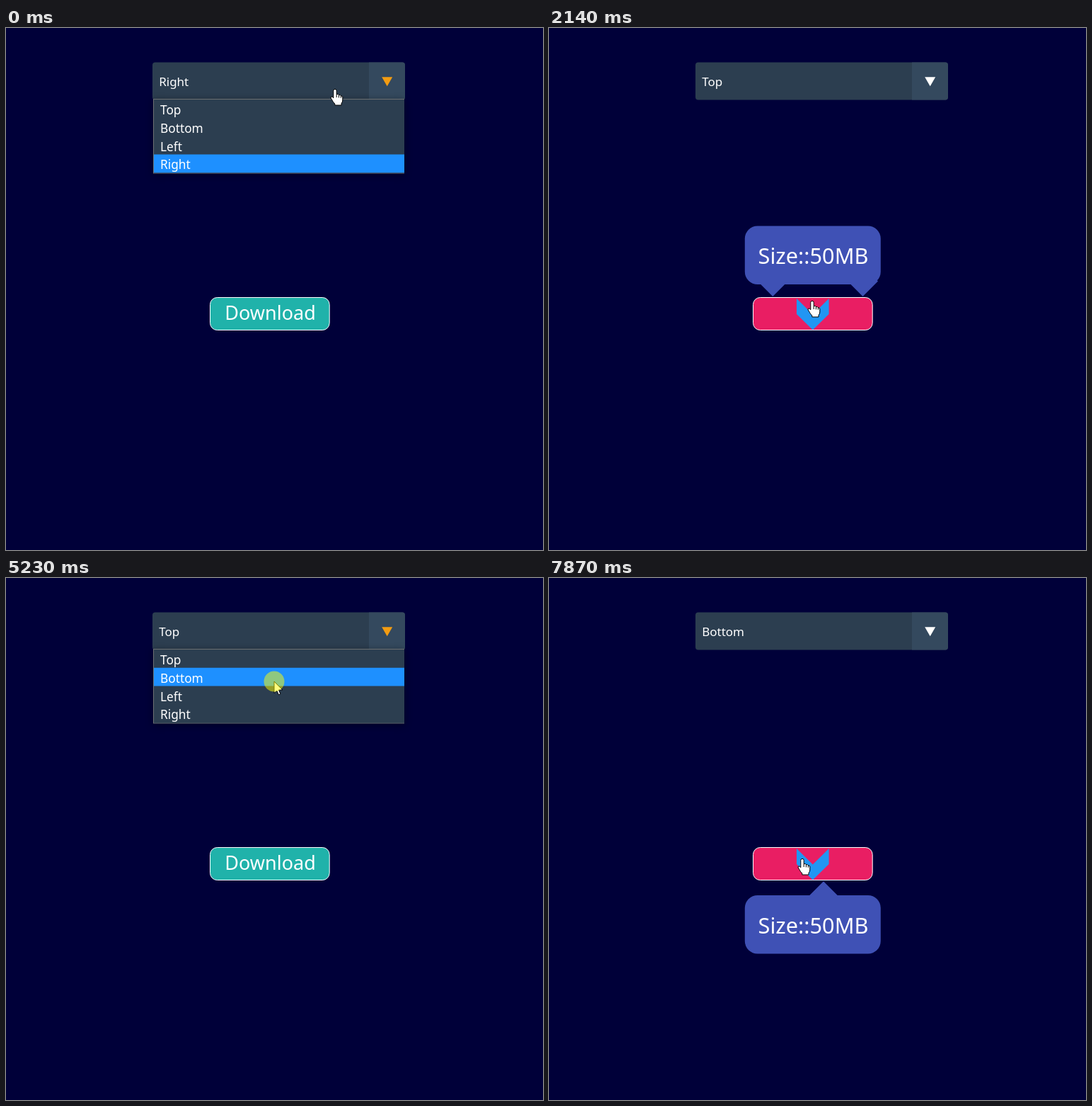
Write an HTML page with a canvas that moves like this. It is 759 by 737 pixels and loops after 8 s.

```html
<!DOCTYPE html>
<html lang="en">
<head>
<meta charset="utf-8">
<title>Tooltip positions</title>
<style>
html, body { margin: 0; width: 100%; height: 100%; overflow: hidden; background: #000039; }
canvas { display: block; }
</style>
</head>
<body>
<canvas id="stage" width="759" height="737"></canvas>
<script>
const ctx = document.getElementById('stage').getContext('2d');
const LOOP = 8000;
const OPTIONS = ['Top', 'Bottom', 'Left', 'Right'];
const HAND = new Path2D('M-2.2 1.6Q-2.2-.6 0-.6T2.2 1.6V6.6Q4.4 5.8 5.4 7.6Q7.6 7 8.3 8.8Q10.8 8.5 10.8 11V15Q10.8 17.5 9 19.5V22H-.2V20Q-2.6 18-3.8 15.2L-5.8 12Q-6.4 10.4-5 10Q-3.6 9.7-2.2 11.8Z');
const KNUCKLES = new Path2D('M2.2 6.6V11M5.4 7.6V11.4M8.3 8.8V11.8');
const ARROW = new Path2D('M0 0V16.5L3.8 13L6.3 18.8L8.9 17.7L6.5 12H11.8Z');

// Each scene: pick an option at `click`, leave the list, hover the button, settle lower
const SCENES = [
  { start: 0, old: 3, pick: 0, from: { x: 465, y: 87 }, row: { x: 447, y: 112 },
    button: { x: 372, y: 386 }, settle: 4, click: 1360, leave: 1560 },
  { start: 4070, old: 0, pick: 1, from: { x: 379, y: 146 }, row: { x: 379, y: 146 },
    button: { x: 358, y: 389 }, settle: 8, click: 5230, leave: 5965 },
];
const PRESS = 150, TRAVEL = 560, REACH = 490;

const clamp = v => Math.min(1, Math.max(0, v));
const mix = (a, b, p) => a + (b - a) * p;

function glide(t, start, length) {
  const p = clamp((t - start) / length);
  return p * p * (3 - 2 * p);
}

// cubic-bezier(.25, .1, .25, 1)
function ease(x) {
  const curve = (a, b, u) => 3 * a * u * (1 - u) ** 2 + 3 * b * u * u * (1 - u) + u ** 3;
  let lo = 0, hi = 1;
  for (let i = 0; i < 24; i++) {
    const u = (lo + hi) / 2;
    if (curve(.25, .25, u) < x) lo = u; else hi = u;
  }
  return curve(.1, 1, lo);
}

function pointer(t, { start, from, row, button, settle, leave }) {
  const enter = glide(t, start + 662, 468), go = glide(t, leave, TRAVEL);
  const at = axis => mix(mix(from[axis], row[axis], enter), button[axis], go);
  return [at('x'), at('y') + settle * glide(t, leave + 640, 200)];
}

function box(x, y, w, h, r, fill, stroke) {
  ctx.beginPath();
  ctx.roundRect(x, y, w, h, r);
  ctx.fillStyle = fill;
  ctx.fill();
  if (stroke) {
    ctx.strokeStyle = stroke;
    ctx.lineWidth = 1;
    ctx.stroke();
  }
}

function poly(fill, ...points) {
  ctx.beginPath();
  points.forEach(p => ctx.lineTo(...p));
  ctx.fillStyle = fill;
  ctx.fill();
}

function text(str, x, y, size, align = 'left') {
  ctx.font = `${size}px "Noto Sans", "Open Sans", sans-serif`;
  ctx.textAlign = align;
  ctx.fillStyle = '#fff';
  ctx.fillText(str, x, y);
}

function drawSelect(value, whiteness) {
  box(207, 48.5, 357, 53, 4, '#2c3e50');
  box(513, 48.5, 51, 53, [0, 4, 4, 0], '#34495e');
  text(value, 216.2, 82, 17);
  const colour = `rgb(${mix(243, 255, whiteness)},${mix(156, 255, whiteness)},${mix(18, 255, whiteness)})`;
  poly(colour, [531.2, 69.2], [546.2, 69.2], [538.7, 82.2]);
}

function drawList(active) {
  const rowHeight = 25.8;
  ctx.save();
  ctx.shadowColor = 'rgba(0,0,0,.4)';
  ctx.shadowBlur = 10;
  ctx.shadowOffsetY = 2;
  box(208, 100, 355, 105.5, 0, '#6d7072');
  ctx.restore();
  box(209, 101, 354, 103.7, 0, '#2c3e50');
  box(209, 101 + active * rowHeight, 354, rowHeight, 0, '#1e90ff');
  OPTIONS.forEach((name, i) => text(name, 218, 122 + i * rowHeight, 17.3));
}

function drawButton(hover) {
  box(288.5, 380.5, 168.7, 46, 10, hover ? '#e91e63' : '#20b2aa', '#fff');
  if (hover) {
    poly('#2196f3', [350, 382], [372.8, 404.5], [395.6, 382], [395.6, 404], [372.8, 426.3], [350, 404]);
  } else {
    text('Download', 373.6, 412, 27, 'center');
  }
}

function drawTooltip(below, age) {
  const top = below ? 448 : 279.5, tipY = below ? 450 : 357.5;
  const p = ease(clamp(age / 1500)), r = 21.5, blue = '#3f51b5';
  for (const start of [313, 446]) {
    const x = mix(start, 388, p);
    poly(blue, [x - r, tipY], [x, tipY - r], [x + r, tipY], [x, tipY + r]);
  }
  box(276.8, top, 192, 82.5, 18, blue);
  text('Size::50MB', 373.5, top + 53.5, 30.7, 'center');
}

function drawPointer(x, y, hand, pressed) {
  ctx.save();
  ctx.translate(x, y);
  ctx.fillStyle = '#fff';
  ctx.strokeStyle = '#000';
  ctx.lineWidth = 1;
  ctx.fill(hand ? HAND : ARROW);
  ctx.stroke(hand ? HAND : ARROW);
  if (hand) ctx.stroke(KNUCKLES);
  ctx.restore();
  if (pressed) box(x - 14.5, y - 14.5, 29, 29, 14.5, 'rgba(255,255,0,.5)');
}

function draw(t) {
  const scene = SCENES.findLast(s => t >= s.start);
  const { old, pick, click, leave } = scene;
  const [x, y] = pointer(t, scene);
  const close = click + PRESS, hover = leave + REACH;
  const open = t < close, over = t >= hover;

  ctx.fillStyle = '#000039';
  ctx.fillRect(0, 0, 759, 737);
  drawSelect(OPTIONS[open ? old : pick], open ? 0 : clamp((t - close + 40) / 270));
  if (open) drawList(y > 101 ? pick : old);
  drawButton(over);
  if (over) drawTooltip(pick === 1, t - hover);
  drawPointer(x, y, over || y < 101, open && t >= click);
}

const begin = performance.now();
function frame() {
  draw((performance.now() - begin) % LOOP);
  requestAnimationFrame(frame);
}
frame();
</script>
</body>
</html>
```
